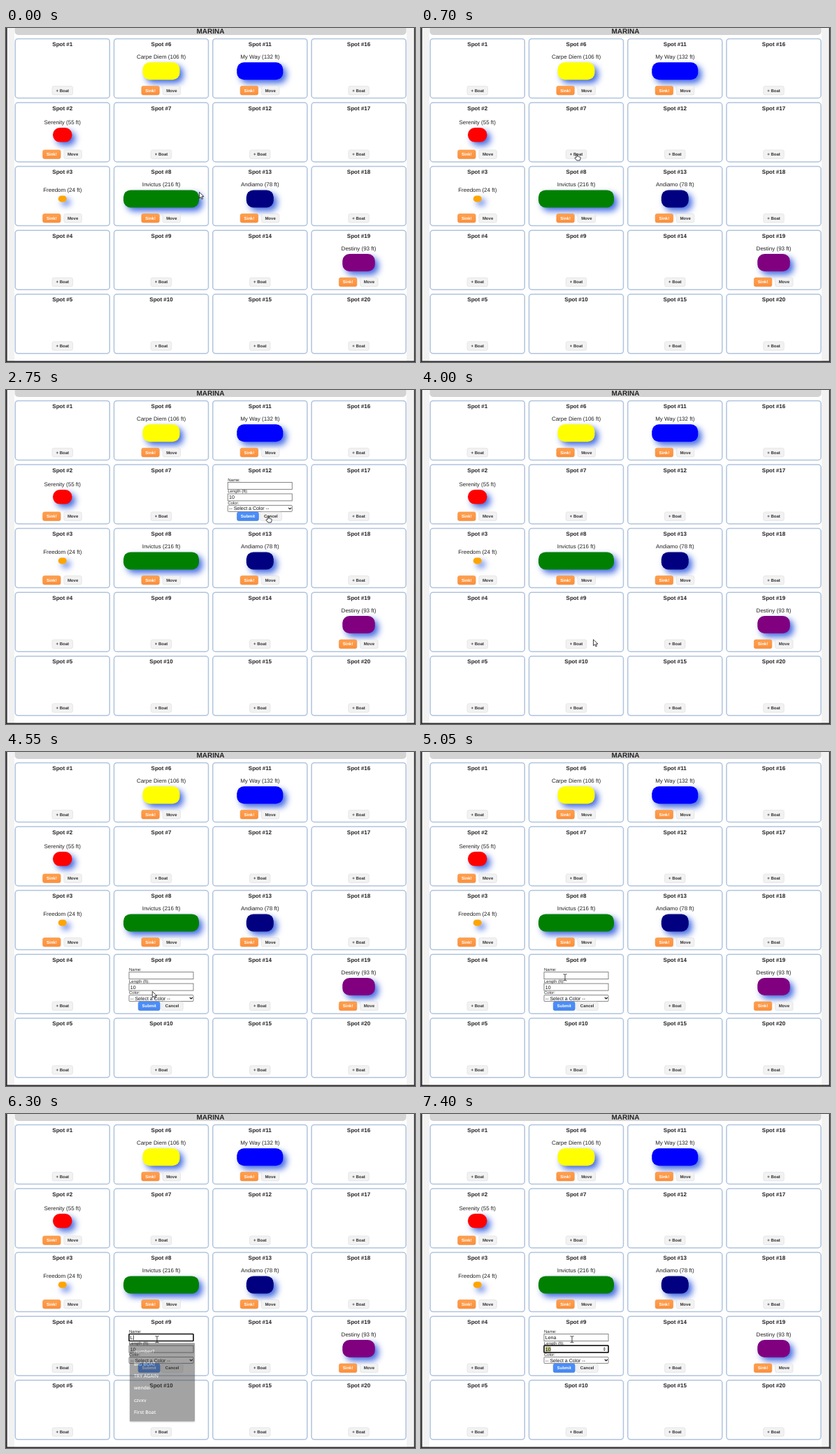
Write an HTML page that moves like this. It is 585 by 479 pixels and loops after 8 s.

```html
<!DOCTYPE html>
<html lang="en">
<head>
<meta charset="utf-8">
<title>Marina</title>
<style>
html, body { margin: 0; width: 100%; height: 100%; overflow: hidden; background: #fff; }
svg { display: block; width: 585px; height: 479px; font-family: "Liberation Sans", Arial, sans-serif; text-rendering: geometricPrecision; cursor: default; }
text { fill: #222; }
.mid { text-anchor: middle; }
.bar { font: bold 10px "Liberation Sans", sans-serif; }
.spot { font-size: 8px; font-weight: bold; }
.boat { font-size: 8px; }
.hull { filter: drop-shadow(5px 5px 5px #4169e1); }
.card { fill: #fff; stroke: #b0c4de; stroke-width: 1.5; }
.button text { font-size: 6px; font-weight: bold; fill: #333; }
.button rect { fill: #f2f2f2; stroke: #dcdcdc; stroke-width: .6; }
.button.sink rect { fill: url(#orange); stroke: #f28d3c; }
.button.submit rect { fill: url(#blue); stroke: #3f7fe8; }
.button.sink text, .button.submit text { fill: #fff; }
.label { font-size: 6px; }
.value { font-size: 7px; fill: #111; }
.field { fill: #fff; stroke: #767676; stroke-width: .9; }
.ring { fill: none; stroke: #101010; stroke-width: 1.5; }
.popup { filter: drop-shadow(0 1px 1px #0006); }
.popup text { font: 600 6.8px "Open Sans", "Noto Sans", sans-serif; fill: #f0f0f0; }
.pointer path { stroke: #111; stroke-width: .8; stroke-linejoin: round; fill: #fff; }
</style>
</head>
<body>
<svg id="stage" viewBox="0 0 585 479">
  <defs>
    <linearGradient id="orange" x2="0" y2="1"><stop stop-color="#ffa04d"/><stop offset="1" stop-color="#fb8f3d"/></linearGradient>
    <linearGradient id="blue" x2="0" y2="1"><stop stop-color="#4d90fe"/><stop offset="1" stop-color="#4787ed"/></linearGradient>
  </defs>
</svg>
<script>
const LOOP = 8000;
const stage = document.getElementById('stage');

function add(parent, tag, attrs = {}, content) {
  const node = document.createElementNS('http://www.w3.org/2000/svg', tag);
  for (const key in attrs) node.setAttribute(key, attrs[key]);
  if (content !== undefined) node.textContent = content;
  parent.append(node);
  return node;
}
const group = (parent, name = '') => add(parent, 'g', { class: name });
const rect = (parent, x, y, width, height, attrs) => add(parent, 'rect', { x, y, width, height, ...attrs });
const label = (parent, x, y, name, content) => add(parent, 'text', { x, y, class: name }, content);
const show = (node, on) => { node.style.display = on ? '' : 'none'; };
const place = (node, x, y) => node.setAttribute('transform', `translate(${x} ${y})`);

function button(parent, x, width, content, kind = '') {
  const g = group(parent, 'button ' + kind);
  rect(g, x - width / 2, 68.5, width, 12.6, { rx: 2.5 });
  label(g, x, 76.9, 'mid', content);
  return g;
}

// Page frame
rect(stage, 0, 0, 585, 479, { fill: '#f2f2f2' });
rect(stage, 12, 0, 561, 479, { fill: '#fff' });
rect(stage, 12.5, -10, 560, 20, { rx: 5, fill: '#d3d3d3' });
label(stage, 292.5, 8.2, 'bar mid', 'MARINA');
add(stage, 'path', { d: 'M.8 0V478.2H584.5V0', fill: 'none', stroke: '#2d2b2d', 'stroke-width': 1.6 });

// Spots and boats
const boats = {
  2: ['Serenity', 55, 'red'], 3: ['Freedom', 24, 'orange'], 6: ['Carpe Diem', 106, 'yellow'],
  8: ['Invictus', 216, 'green'], 11: ['My Way', 132, 'blue'], 13: ['Andiamo', 78, 'navy'],
  19: ['Destiny', 93, 'purple']
};
const origin = spot => [80.75 + 141.25 * Math.floor((spot - 1) / 5), 14.8 + 91.6 * ((spot - 1) % 5)];
const addButtons = {};

for (let spot = 1; spot <= 20; spot++) {
  const g = group(stage);
  place(g, ...origin(spot));
  rect(g, -67.5, .6, 135, 85, { rx: 4, class: 'card' });
  label(g, 0, 11.2, 'spot mid', 'Spot #' + spot);
  if (!boats[spot]) {
    addButtons[spot] = button(g, 0, 29.5, '+ Boat');
    continue;
  }
  const [name, feet, fill] = boats[spot];
  const height = Math.min(25, feet * .375);
  rect(g, -feet / 4, 46.9 - height / 2, feet / 2, height, { rx: Math.min(10, height / 2), fill, class: 'hull' });
  label(g, 0, 41.5 - height / 2, 'boat mid', `${name} (${feet} ft)`);
  button(g, -15.4, 25.5, 'Sink!', 'sink');
  button(g, 14.8, 25.5, 'Move');
}

// New boat form
const form = group(stage);
const field = (y, h, rx = 0) => rect(form, -46, y, 92, h, { class: 'field', rx });
label(form, -46, 24.6, 'label', 'Name:');
label(form, -46, 41, 'label', 'Length (ft):');
label(form, -46, 57.5, 'label', 'Color:');
field(26, 10);
field(42.5, 10);
field(59, 9, 1);
const selection = rect(form, -44.2, 43.8, 8, 7.4, { fill: '#c6c68e' });
const nameText = label(form, -44.2, 33.6, 'value', '');
label(form, -44.2, 50.1, 'value', '10');
label(form, -44.2, 66, 'value', '-- Select a Color --');
add(form, 'path', { d: 'M40.8 62.4l2 2 2-2', fill: 'none', stroke: '#111', 'stroke-width': 1.1 });
const spinner = add(form, 'path', { d: 'M38.6 46.8l1.7-2 1.7 2zM38.6 48.2l1.7 2 1.7-2z', fill: '#444' });
const ring = rect(form, -46, 0, 92, 10, { class: 'ring', rx: .8 });
const caret = rect(form, 0, 27.6, .7, 7, { fill: '#111' });
button(form, -17.3, 31, 'Submit', 'submit');
button(form, 15.7, 31, 'Cancel');

const popup = group(form, 'popup');
rect(popup, -45, 38.6, 93, 112.6, { rx: 1, fill: '#3d3d3d' });
['number?', 'BIG BOAT', 'TRY AGAIN', 'wendel', 'czvxv', 'First Boat']
  .forEach((item, i) => label(popup, -39, 53.6 + 17.4 * i, '', item));

// Mouse pointers, drawn from their top left corner
const pointers = {};
for (const [kind, d] of Object.entries({
  arrow: 'M.5 .4V9.2L2.6 7.3 4 10.4 5.5 9.7 4.1 6.7H7Z',
  hand: 'M3 6V1.2Q3.8 .1 4.6 1.2V4.2Q5.5 3.5 6.2 4.5 7 3.9 7.7 4.9 8.8 4.5 9 5.6V7.4L8.2 10H3.8L1 6.6Q1.2 5.2 3 6Z',
  beam: 'M1 .6Q3 .4 3.5 1.4 4 .4 6 .6M3.5 1.4V9M1 9.8Q3 10 3.5 9 4 10 6 9.8'
})) {
  pointers[kind] = group(stage, 'pointer');
  add(pointers[kind], 'path', { d });
}

// time, x, y, pointer used from this time on
const track = [
  [0, 276, 235, 'arrow'], [250, 283, 263, 'arrow'], [450, 264, 226, 'arrow'], [550, 222, 190, 'arrow'],
  [600, 211, 181, 'hand'], [650, 219, 180, 'hand'], [1650, 219, 180, 'hand'], [1700, 234, 178, 'hand'],
  [1750, 234, 180, 'hand'], [2050, 234, 180, 'arrow'], [2300, 355, 179, 'hand'], [2400, 371, 180, 'hand'],
  [2850, 371, 180, 'hand'], [3200, 378, 181, 'hand'], [3500, 378, 181, 'hand'], [3600, 370, 190, 'arrow'],
  [3800, 290, 310, 'arrow'], [4000, 246, 357.5, 'arrow'], [4100, 224, 361, 'hand'], [4200, 212, 360, 'hand'],
  [4350, 212, 360, 'hand'], [4500, 210, 347, 'arrow'], [4700, 205, 331, 'beam'], [5050, 202.5, 318, 'beam'],
  [5200, 202.5, 318, 'beam'], [5250, 212.5, 318, 'beam'], [LOOP, 212.5, 318, 'beam']
];
const openings = [[7, 950, 2050], [12, 2750, 3550], [9, 4350, LOOP]];
const typing = [[6250, 'L'], [6400, 'e'], [6600, 'n'], [6850, 'a']];
const popupSteps = [[0, 0], [5250, .47], [5350, 1], [6300, .47], [6400, 0]];

function drawPointer(t) {
  const next = track.findIndex(key => key[0] > t);
  const [t0, x0, y0, kind] = track[next - 1];
  const [t1, x1, y1] = track[next];
  const k = (t - t0) / (t1 - t0);
  for (const name in pointers) show(pointers[name], name === kind);
  place(pointers[kind], x0 + (x1 - x0) * k, y0 + (y1 - y0) * k);
}

function drawForm(t) {
  const open = openings.find(([, from, to]) => t >= from && t < to);
  for (const spot in addButtons) show(addButtons[spot], !open || open[0] !== +spot);
  show(form, open);
  if (!open) return;
  place(form, ...origin(open[0]));

  const onLength = t >= 7400;
  const onName = t >= 5250 && !onLength;
  nameText.textContent = typing.filter(([at]) => t >= at).map(([, letter]) => letter).join('');
  show(ring, onName || onLength);
  ring.setAttribute('y', onLength ? 42.5 : 26);
  show(selection, onLength);
  show(spinner, onLength);
  show(caret, onName && (t < 5850 || t >= 6250));
  caret.setAttribute('x', -43.9 + (nameText.textContent ? nameText.getComputedTextLength() : 0));

  const opacity = popupSteps.filter(([at]) => t >= at).pop()[1];
  show(popup, opacity);
  popup.setAttribute('opacity', opacity);
}

function render() {
  const t = Math.floor(performance.now() % LOOP / 50) * 50;
  drawForm(t);
  drawPointer(t);
  requestAnimationFrame(render);
}
render();
</script>
</body>
</html>
```
